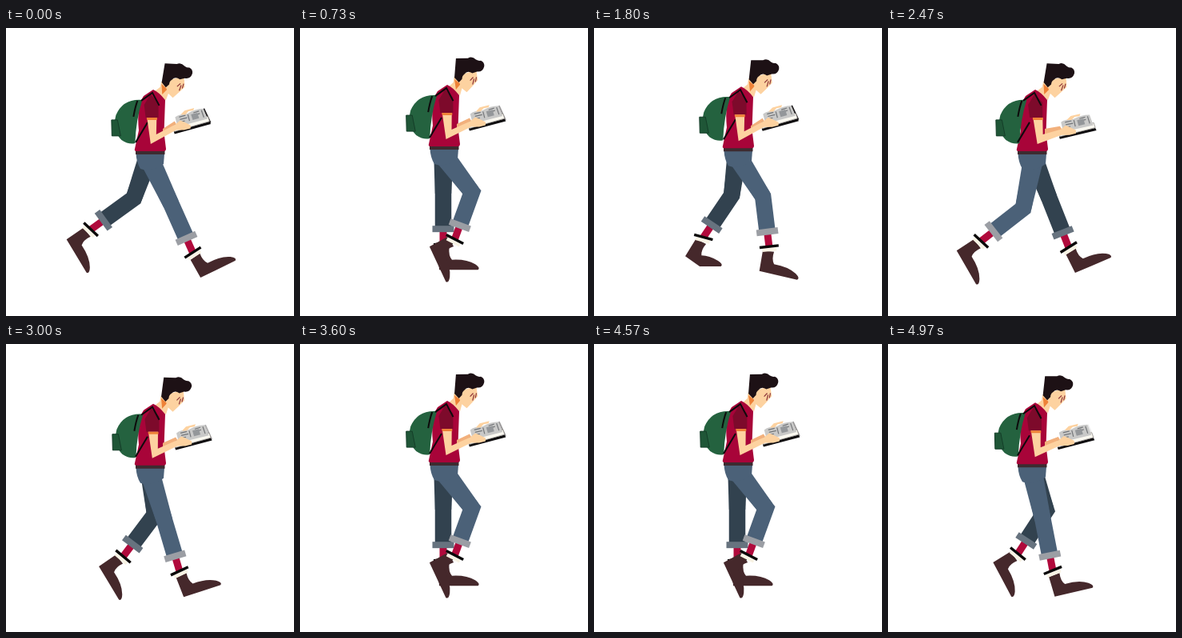
Recreate the animation shown at these times as an HTML page. Size 360x360 px, loop 5 s.

```html
<!DOCTYPE html>
<html lang="en">
<head>
<meta charset="utf-8">
<title>Walking reader</title>
<style>
  html, body { margin: 0; width: 100%; height: 100%; overflow: hidden; background: #fff; }
  svg { display: block; width: 100%; height: 100%; }
  .line { fill: none; stroke: #0d0a0c; stroke-width: 2; }
  .skin { fill: #fdd2a0; }
  .far { --cloth: #32424f; --cuff: #67737f; }
  .near { --cloth: #4b6178; --cuff: #9b9ea4; }
  .thigh { fill: var(--cloth); }
  .pants { fill: none; stroke: var(--cloth); stroke-width: 20.5; stroke-miterlimit: 8; }
  .cuff { stroke: var(--cuff); stroke-width: 8; }
  .sock { stroke: #b00a3c; stroke-width: 9; }
  .trim { stroke: #f8f3e4; stroke-width: 4; }
  .band { stroke: #0a0808; stroke-width: 3.4; }
  .boot { fill: #45282b; }
</style>
</head>
<body>
<svg viewBox="0 0 360 360">
  <g id="far" class="far"></g>
  <g id="near" class="near"></g>
  <g id="body">
    <path fill="#4b6178" d="M162.500 154H198L197 167Q182 178 168 173Q163 165 162.500 154Z"/>
    <path fill="#3d2b30" d="M162 150H198.500V155H162Z"/>
    <g id="head">
      <path class="skin" d="M193 64L204 74L200 87L185 77L192 71Z"/>
      <path fill="#ee8238" d="M193.500 67L201 73L195 80Z"/>
      <path class="skin" d="M199 67Q200 59 207 60L221 56L222.500 69L216 76L208.500 83.500L201 77Z"/>
      <path fill="#1d1115" d="M196 41L211 41Q216 38 221 43Q224 45 227 44.500Q232 47 231 52Q229 59 222 58L216 60Q210 56 206 61Q203 63 203 67L199 71L193.500 65Z"/>
      <path fill="none" stroke="#8b3338" stroke-width="1.200" d="M213 69L217 65M216 74L218 67M219.500 71L221 65"/>
    </g>
    <path fill="#a80439" d="M184 74Q191 77 199 87L197.500 128L200 148Q200 151 197 151H163Q160 151 161 148L166 125Q163 95 172 82Z"/>
    <g id="bag">
      <path fill="#24623f" d="M172 87Q148 85 139 106Q134 125 146 137Q155 143 163 141Q164 112 172 87Z"/>
      <path fill="#1f5637" stroke="#143d28" d="M133.500 112H141L145 132H134Z"/>
      <path class="line" d="M166 88Q163 96 161 108"/>
    </g>
    <path class="line" d="M177 115L162 140"/>
    <path id="farArm" fill="#f2b07c"/>
    <g id="book">
      <path id="edge" class="line" stroke-width="2.500" d="M250 102L258 120"/>
      <path fill="#0f0d0f" d="M212 130L257 118.500L258.500 121.500L213 133Z"/>
      <path fill="#fbf9f1" stroke="#77736f" stroke-width=".6" d="M212.500 122L255 112L257 118L213 130Z"/>
      <path fill="#c9c9c8" d="M214 112Q219 108 229 108Q239 102 249.500 102L254.500 115L217 124Z"/>
      <path fill="none" stroke="#747679" stroke-width="1.200" d="M219 112L227 110M220 115L229 113M221 118L226 117M230 109L232 117M237 107L244 105M238 110L245 108M247 104L250 113"/>
      <path fill="#94979a" d="M234 109L242 107L244 114L236 116Z"/>
      <path class="skin" d="M221 109L226 104L238 101L237 104L231 105L227 109Z"/>
    </g>
    <g id="sleeve">
      <path fill="#7d0a2b" d="M174 93L182 80L192 90V109H176Z"/>
    </g>
    <path class="line" d="M169 88L183 78L191.500 94"/>
    <path id="arm" class="skin"/>
    <path id="shade" fill="#ee8238" d="M178.500 109H191.500V112H179Z"/>
  </g>
</svg>
<script>
const $ = id => document.getElementById(id);
const RAD = Math.PI / 180;
const THIGH = 57.5, SHIN = 45.5, ANKLE = 64.5;

// phase, thigh, shin, foot and boot-band angles in degrees
const STRIDE = [
  [0, 26, 24, -26, -33],
  [.042, 22, 21.5, -23, -32],
  [.125, 17.5, 16.5, -18, -25],
  [.167, 13, 11, -13, -22],
  [.25, 0, 0, 0, -5],
  [.375, -7, -34, 35, 15],
  [.5, -19, -54, 59, 43],
  [.542, -11, -52, 60, 43],
  [.625, 7, -37, 59, 40],
  [.667, 19, -33, 62, 39],
  [.75, 38, -20, 65, 27],
  [.875, 33, 7, 13, -6]
];

function key(i) {
  const n = STRIDE.length, lap = Math.floor(i / n);
  const k = STRIDE[i - lap * n].slice();
  k[0] += lap;
  return k;
}

// Smooth periodic curve through the stride poses
function pose(p) {
  let i = STRIDE.length - 1;
  while (STRIDE[i][0] > p) i--;
  const [a, b, c, d] = [-1, 0, 1, 2].map(o => key(i + o));
  const h = c[0] - b[0], s = (p - b[0]) / h, s2 = s * s, s3 = s2 * s;
  return [1, 2, 3, 4].map(j => {
    const m0 = (c[j] - a[j]) / (c[0] - a[0]) * h;
    const m1 = (d[j] - b[j]) / (d[0] - b[0]) * h;
    return (2 * s3 - 3 * s2 + 1) * b[j] + (s3 - 2 * s2 + s) * m0
      + (3 * s2 - 2 * s3) * c[j] + (s3 - s2) * m1;
  });
}

const along = ([x, y], angle, len) =>
  [x + Math.sin(angle * RAD) * len, y + Math.cos(angle * RAD) * len];

function bootPath(bend) {
  const co = Math.cos(bend * RAD), si = Math.sin(bend * RAD);
  const toe = (x, y) => {
    const dx = x - 17, dy = y - 32.5;
    return [17 + dx * co - dy * si, 32.5 + dx * si + dy * co];
  };
  return `M-6.500 7L7.500 5Q6.500 15 11 20Q${toe(29, 19)} ${toe(40, 25.5)}` +
    `Q${toe(47, 30)} ${toe(43.5, 32.5)}L17 32.500L-5 32.500Z`;
}

function leg(id, hip, p) {
  const [thigh, shin, foot, band] = pose(p);
  // legs reach longest at full stride and shorten while passing
  const reach = 1 + .035 * Math.cos(4 * Math.PI * (p - .05));
  const knee = along(hip, thigh, THIGH * reach);
  const hem = along(knee, shin, SHIN * reach);
  const ankle = along(knee, shin, ANKLE * reach);
  const bend = -35 * Math.max(0, 1 - Math.abs(p - .375) / .125);
  const side = (pt, w) => along(pt, thigh + 90, w);
  $(id).innerHTML =
    `<path class="sock" d="M${hem}L${ankle}"/>
    <g transform="translate(${ankle})">
      <path class="boot" transform="rotate(${foot})" d="${bootPath(bend)}"/>
      <g transform="rotate(${band})">
        <path class="trim" d="M-9 4H9"/><path class="band" d="M-12 0H12"/>
      </g>
    </g>
    <path class="thigh" d="M${side(hip, -12)}L${side(hip, 13)}L${side(knee, 10.2)}L${side(knee, -10.2)}Z"/>
    <path class="pants" d="M${hip}L${knee}L${hem}"/>
    <path class="cuff" d="M${along(hem, shin + 90, -13.5)}L${along(hem, shin + 90, 13.5)}"/>`;
}

function draw(t) {
  // 25 steps a second shown on a 30 Hz grid; 24 steps make one stride
  const step = Math.floor(Math.floor(t * .03 + .1) / 1.2 + 1e-6);
  const p = step % 24 / 24;
  const bob = Math.cos(4 * Math.PI * (p - .02));
  const sway = -Math.cos(2 * Math.PI * (p - .93));
  const y = 3 * bob;
  const move = (id, value) => $(id).setAttribute("transform", value);

  leg("far", [179, 154 + y], (p + .5) % 1);
  leg("near", [180.5, 164 + y], p);

  move("body", `translate(0 ${y})`);
  move("head", `rotate(${1 + 2.5 * bob} 193 84)`);
  move("bag", `translate(${1.8 * sway} 0)`);
  move("sleeve", `translate(${1.5 * sway} 0)`);
  move("shade", `translate(${3 * sway} 0)`);

  const bx = 2.5 * sway, by = 3.8 * sway;
  move("book", `translate(${bx} ${by}) rotate(${1.3 * sway} 213 131)`);
  $("edge").setAttribute("opacity", Math.max(0, -sway));

  const at = (x, y) => [x + bx, y + by];
  const arm = 3 * sway, elbow = 186 + 3.5 * sway;
  $("farArm").setAttribute("d", `M196 123L${at(213, 117)}L${at(216, 122)}L196 130Z`);
  $("arm").setAttribute("d",
    `M${179 + arm} 109H${191 + arm}L${elbow + 5} 130L${at(214, 121)}L${at(220, 116)}` +
    `L${at(225, 118)}L${at(233, 122)}L${at(233, 126)}L${at(225, 128)}L${at(215, 128)}L${elbow - 2} 142Z`);
}

const start = performance.now();
function tick() {
  draw((performance.now() - start) % 5000);
  requestAnimationFrame(tick);
}
tick();
</script>
</body>
</html>
```
